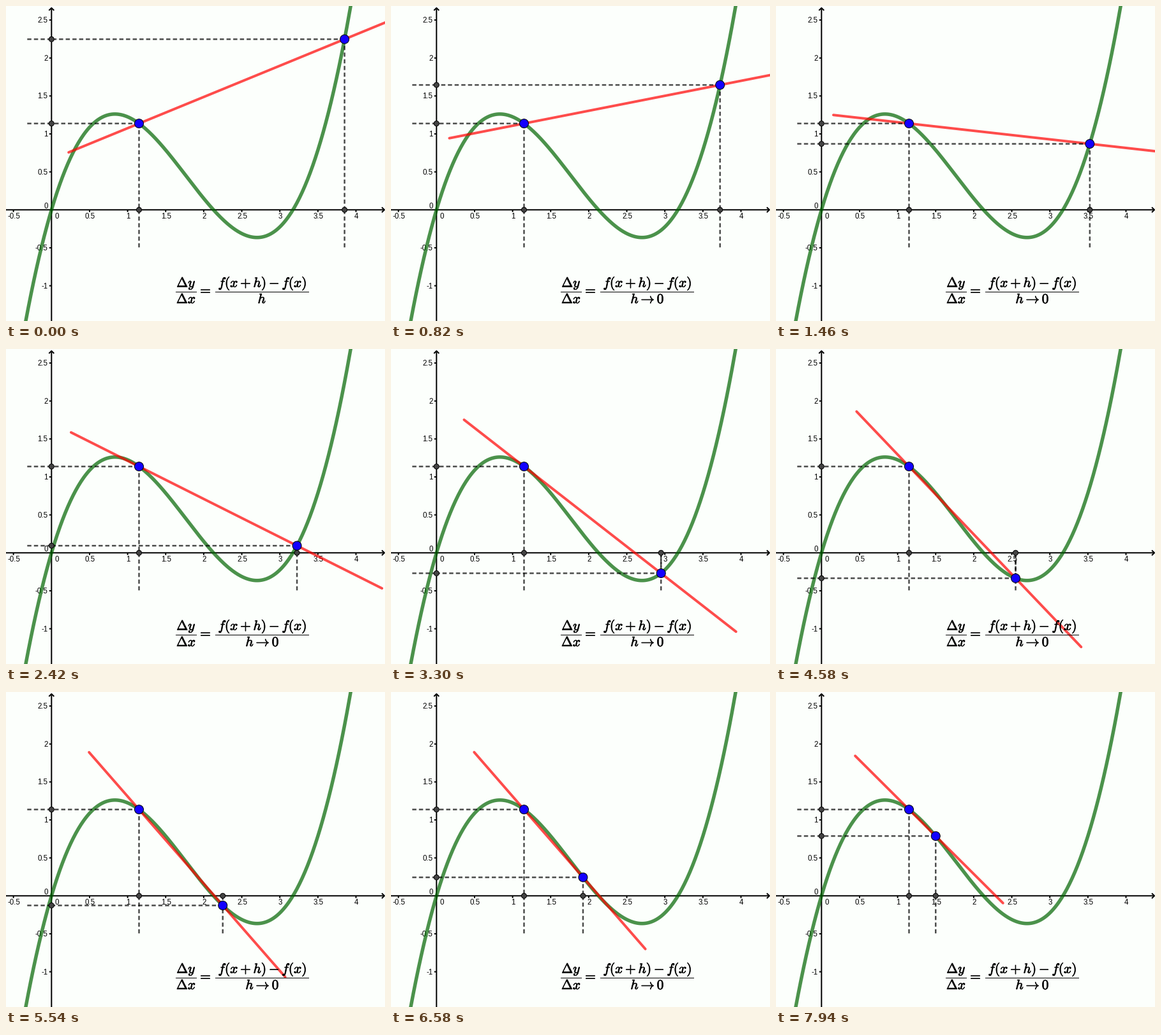
A matplotlib script for the animation above (8 s loop, 594 by 495 pixels).

```python
import numpy as np
import matplotlib.pyplot as plt
from matplotlib.animation import FuncAnimation
from matplotlib.patches import Circle, PathPatch
from matplotlib.textpath import TextPath
from matplotlib.transforms import Affine2D

W, H = 594, 495
X0, Y0, UNIT = 71.3, 320.3, 119.3      # origin and scale in pixels
A, B_START, B_STEP = 1.15, 3.85, 0.025
TICK_MS, HOLD_MS, MOVE_MS, LOOP_MS = 20, 500, 80, 8000

plt.rcParams["font.family"] = "Liberation Sans"
plt.rcParams["mathtext.fontset"] = "cm"
plt.rcParams["lines.scale_dashes"] = False

# 72 dpi makes one point equal one pixel
fig = plt.figure(figsize=(W / 72, H / 72), dpi=72, facecolor="#fcfffc")
ax = fig.add_axes([0, 0, 1, 1])
ax.set_xlim(0, W)
ax.set_ylim(H, 0)
ax.axis("off")


def f(x):
    return 0.5 * x * (x * x - 5.3 * x + 6.75)


def px(x):
    return X0 + UNIT * np.asarray(x, float)


def py(y):
    return Y0 - UNIT * np.asarray(y, float)


def stroke(xs, ys, width=2, color="black", **kw):
    return ax.plot(xs, ys, lw=width, color=color, **kw)[0]


def axis_line(xs, ys):
    stroke(xs, ys, snap=False, solid_capstyle="butt", zorder=1)


def dashed():
    return stroke([], [], 2.5, alpha=0.7, ls=(0, (6.5, 4)), snap=False,
                  zorder=4)


def dot(radius, fill, z):
    return ax.add_patch(Circle((0, 0), radius, fc=fill, ec="black", lw=1,
                               zorder=z))


def label(x, y, value, align):
    ax.text(x, y, f"{value:g}", size=11.5, ha=align, va="baseline", zorder=1)


def formula(x, base, tex, size=21.4):
    """Bold math centred on x, standing on the given baseline."""
    path = TextPath((0, 0), f"${tex}$", size=size)
    box = path.get_extents()
    move = Affine2D().scale(1, -1).translate(x - (box.x0 + box.x1) / 2, base)
    return ax.add_patch(PathPatch(path.transformed(move), fc="black",
                                  ec="black", lw=0.75, zorder=8))


# Axes with arrow heads, ticks and numbers
axis_line([0, 593], [Y0, Y0])
axis_line([X0, X0], [3, H])
axis_line([589, 593, 589], [Y0 - 4, Y0, Y0 + 4])
axis_line([X0 - 4, X0, X0 + 4], [7, 3, 7])

for v in np.arange(-0.5, 4.1, 0.5):
    if v:
        axis_line([px(v)] * 2, [Y0, Y0 + 3.5])
    label(px(v) + (8.2 if v == 0 else 0.5), 334, v, "center")
for v in np.arange(-1, 2.6, 0.5):
    if v:
        axis_line([X0 - 3.5, X0], [py(v)] * 2)
    label(65.5, 318 if v == 0 else py(v) + 4, v, "right")

xs = np.linspace(-0.5, 4.1, 400)
stroke(px(xs), py(f(xs)), 5.5, "#006400", alpha=0.7, zorder=2)

# Difference quotient
formula(282, 441.5, r"\Delta y")
formula(282, 467, r"\Delta x")
formula(312.5, 453.5, "=")
formula(401.5, 441.5, "f(x+h)-f(x)")
plain_h = formula(401, 467, "h")
limit_h = formula(401.5, 467, r"h\rightarrow 0")
for x1, x2 in ((266, 298), (328, 474)):
    stroke([x1, x2], [448.5, 448.5], 1, zorder=8)

secant = stroke([], [], 4, "red", alpha=0.7, solid_capstyle="round", zorder=3)
guides = [[dashed() for _ in range(4)] for _ in range(2)]
feet = [dot(4, "#444444", 6) for _ in range(4)]
points = [dot(7, "#1400ff", 7) for _ in range(2)]


def set_guides(lines, x):
    y = f(x)
    ends = (((x, x), (y, 0)), ((x, x), (0, -0.5)),
            ((x, 0), (y, y)), ((0, -0.32), (y, y)))
    for line, (u, v) in zip(lines, ends):
        line.set_data(px(u), py(v))


def place(circles, spots):
    for circle, (x, y) in zip(circles, spots):
        circle.center = px(x), py(y)


def update(i):
    t = i * TICK_MS
    n = 0 if t < HOLD_MS else (t - HOLD_MS) // MOVE_MS + 1
    b = B_START - B_STEP * n
    p, q = np.array([A, f(A)]), np.array([b, f(b)])
    d = (q - p) / np.hypot(*(q - p))
    start, end = p - d, q + 1.25 * d

    secant.set_data(px([start[0], end[0]]), py([start[1], end[1]]))
    set_guides(guides[0], A)
    set_guides(guides[1], b)
    place(feet, [(A, 0), (b, 0), (0, p[1]), (0, q[1])])
    place(points, [p, q])
    plain_h.set_visible(n == 0)
    limit_h.set_visible(n > 0)
    return [secant, *guides[0], *guides[1], *feet, *points, plain_h, limit_h]


anim = FuncAnimation(fig, update, frames=LOOP_MS // TICK_MS, interval=TICK_MS,
                     init_func=lambda: update(0), repeat=True, repeat_delay=0)
plt.show()
```
